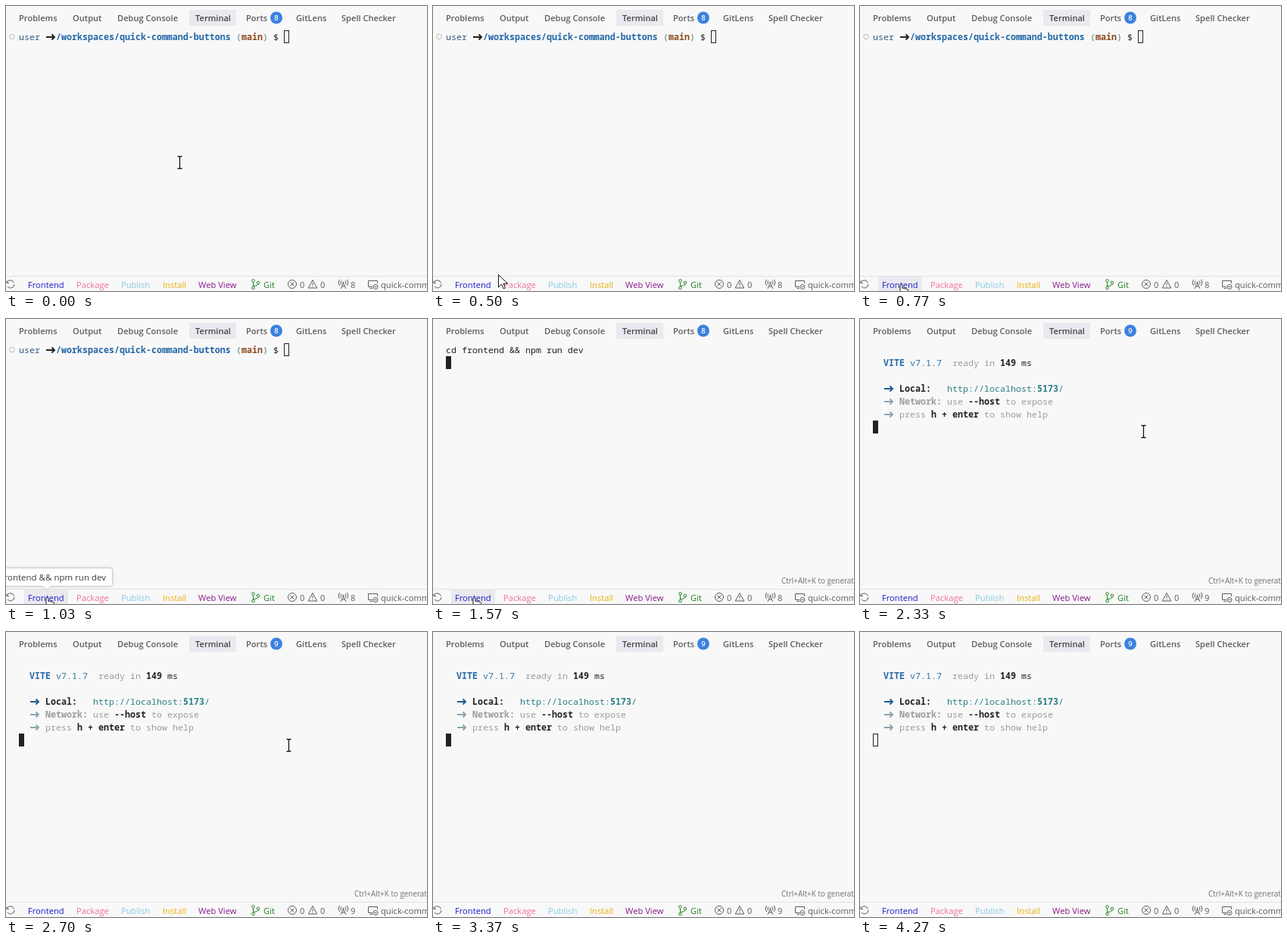
Animation, 556 px wide and 376 px high, one loop 4.3 s. Source, as an HTML page with a canvas:

```html
<!DOCTYPE html>
<html lang="en">
<head>
<meta charset="utf-8">
<title>Quick command buttons</title>
<style>
html, body { margin: 0; width: 100%; height: 100%; overflow: hidden; background: #f8f8f8; }
canvas { display: block; width: 556px; height: 376px; }
</style>
</head>
<body>
<canvas id="stage"></canvas>
<script>
const W = 556, H = 376, LOOP = 4300;
const CELL = 7, LINE = 17, LEFT = 17;
const UI = '"Open Sans", "Noto Sans", sans-serif';
const MONO = '11.667px "Noto Sans Mono", "DejaVu Sans Mono", monospace';
const PAPER = '#f8f8f8', ACTIVE = '#e9e9ef', EDGE = '#e3e3e6';
const INK = '#222', DIM = '#9c9c9c', GRAY = '#5c5c5c', BLUE = '#2468a8', TEAL = '#2a7f86';

const canvas = document.getElementById('stage');
const ctx = canvas.getContext('2d');
const dpr = window.devicePixelRatio || 1;
canvas.width = W * dpr;
canvas.height = H * dpr;

// Moments in the loop
const HOVER = 560, TIP_IN = 900, CLICK = 1130, RUN = 1270;
const READY = 1970, PORT = 2200, HIDE = 3370, BLUR = 4010;

// Pointer path: time, x, y
const path = [
  [30, 229, 206], [500, 86, 354], [640, 54, 367],
  [1960, 54, 367], [2330, 374, 148], [2470, 373, 149],
  [3200, 373, 149], [3350, 260, 85]
];

function pointerAt(t) {
  if (t <= path[0][0]) return path[0].slice(1);
  for (let i = 1; i < path.length; i++) {
    const [t0, x0, y0] = path[i - 1], [t1, x1, y1] = path[i];
    if (t < t1) {
      const u = (t - t0) / (t1 - t0), e = u * u * (3 - 2 * u);
      return [x0 + (x1 - x0) * e, y0 + (y1 - y0) * e];
    }
  }
  return path[path.length - 1].slice(1);
}

function label(text, x, y, color, size = 11.2, weight = 400, align = 'left') {
  ctx.font = `${weight} ${size}px ${UI}`;
  ctx.textAlign = align;
  ctx.fillStyle = color;
  ctx.fillText(text, x, y);
}

function mono(text, col, row, color, bold) {
  ctx.font = (bold ? 'bold ' : '') + MONO;
  ctx.textAlign = 'left';
  ctx.fillStyle = color;
  ctx.fillText(text, LEFT + col * CELL, 45 + row * LINE);
}

function stroke(d, color, width = 1) {
  ctx.strokeStyle = color;
  ctx.lineWidth = width;
  ctx.stroke(new Path2D(d));
}

function ring(x, y, r, color) {
  ctx.beginPath();
  ctx.arc(x, y, r, 0, 7);
  ctx.strokeStyle = color;
  ctx.lineWidth = 1;
  ctx.stroke();
}

function promptArrow(col, row, color) {
  const x = LEFT + col * CELL, y = 41 + row * LINE;
  stroke(`M${x + 1} ${y}H${x + 12}M${x + 8.5} ${y - 3.5}L${x + 12} ${y}L${x + 8.5} ${y + 3.5}`, color, 1.9);
}

function block(col, row, filled) {
  const x = LEFT + col * CELL, y = 32 + row * LINE;
  ctx.fillStyle = ctx.strokeStyle = INK;
  ctx.lineWidth = 1;
  if (filled) ctx.fillRect(x, y, 7, 17);
  else ctx.strokeRect(x + .5, y + .5, 6, 16);
}

function drawTabs(ports) {
  ctx.fillStyle = ACTIVE;
  ctx.fillRect(242, 5, 62, 21);
  const tabs = [['Problems', 17], ['Output', 88], ['Debug Console', 147], ['Terminal', 250],
    ['Ports', 317], ['GitLens', 383], ['Spell Checker', 443]];
  for (const [name, x] of tabs) {
    label(name, x, 20, name === 'Terminal' ? '#454545' : GRAY, 11.1, 600);
  }
  ctx.fillStyle = '#3b82de';
  ctx.beginPath();
  ctx.arc(357, 15.5, 8, 0, 7);
  ctx.fill();
  label(ports, 357, 19, '#fff', 9.5, 600, 'center');
}

function drawStatus(ports, hover) {
  ctx.fillStyle = EDGE;
  ctx.fillRect(0, 356, W, 1);
  if (hover) {
    ctx.fillStyle = ACTIVE;
    ctx.fillRect(24, 357, 58, 19);
  }
  const items = [['Frontend', 29, '#1c1cc8'], ['Package', 93, '#f0709c'], ['Publish', 152, '#86c8e4'],
    ['Install', 207, '#eab010'], ['Web View', 254, '#861a8a'], ['Git', 340, '#228022'],
    ['0', 388, GRAY], ['0', 415, GRAY], [ports, 455, GRAY], ['quick-command-buttons', 495, GRAY]];
  for (const [name, x, color] of items) label(name, x, 372, color);

  // Sync
  stroke('M1 365A5 5 0 0 1 10.5 365.500M11 367A5 5 0 0 1 2 370M1 362.500V365.500H4', GRAY);
  // Branch
  const green = '#228022';
  ring(326.5, 362.5, 1.8, green);
  ring(326.5, 372, 1.8, green);
  ring(333, 365, 1.8, green);
  stroke('M326.500 364.500V370M333 367C333 369 330 369 326.500 369.500', green);
  // Errors and warnings
  ring(378, 367, 5.5, GRAY);
  stroke('M375.500 364.500L380.500 369.500M380.500 364.500L375.500 369.500', GRAY);
  stroke('M405 361.500L410.800 372H399.200ZM405 365V368.500M405 369.700V370.700', GRAY);
  // Antenna
  stroke('M445.500 366L442 373M445.500 366L449 373M443.500 370H447.500M442.800 362.500Q441 365 442.800 367.500M440.800 361Q437.500 365 440.800 369M448.200 362.500Q450 365 448.200 367.500M450.200 361Q453.500 365 450.200 369', GRAY);
  ring(445.5, 365, .8, GRAY);
  // Remote screen
  stroke('M484 370.500H478.500V362.500H490.500V366M480.500 372.500H484', GRAY);
  ring(488, 370.5, 3, GRAY);
  stroke('M486.500 370.500H489.500', GRAY);
}

function drawPrompt() {
  ring(8, 40.5, 3.3, '#bcbcbc');
  mono('user', 0, 0, '#2f5a80');
  promptArrow(5, 0, INK);
  mono('/workspaces/quick-command-buttons', 7, 0, BLUE, true);
  mono('(', 41, 0, '#4f7f86');
  mono('main', 42, 0, '#8b4a1c', true);
  mono(')', 46, 0, '#4f7f86');
  mono('$', 48, 0, INK);
  block(50, 0, false);
}

function drawCommand() {
  mono('cd frontend && npm run dev', 0, 0, INK);
  block(0, 1, true);
}

function drawServer(focused) {
  mono('VITE', 2, 1, BLUE, true);
  mono('v7.1.7', 7, 1, '#34709c');
  mono('ready in', 15, 1, DIM);
  mono('149', 24, 1, INK, true);
  mono('ms', 28, 1, INK);

  promptArrow(2, 3, '#1f5c92');
  mono('Local:', 5, 3, INK, true);
  mono('http://localhost:', 14, 3, TEAL);
  mono('5173', 31, 3, TEAL, true);
  mono('/', 35, 3, TEAL);

  promptArrow(2, 4, '#8ca4ae');
  mono('Network:', 5, 4, DIM, true);
  mono('use', 14, 4, DIM);
  mono('--host', 18, 4, INK, true);
  mono('to expose', 25, 4, DIM);

  promptArrow(2, 5, '#8ca4ae');
  mono('press', 5, 5, DIM);
  mono('h + enter', 11, 5, INK, true);
  mono('to show help', 21, 5, DIM);
  block(0, 6, focused);
}

function drawTip(alpha) {
  ctx.save();
  ctx.globalAlpha = alpha;
  ctx.beginPath();
  ctx.roundRect(-30, 328.5, 170.5, 24, 3);
  ctx.fillStyle = '#fff';
  ctx.shadowColor = 'rgba(0,0,0,.16)';
  ctx.shadowBlur = 5;
  ctx.fill();
  ctx.shadowColor = 'transparent';
  ctx.strokeStyle = '#cdcdd2';
  ctx.lineWidth = 1;
  ctx.stroke();
  ctx.fill(new Path2D('M48 352H60L54 357Z'));
  stroke('M48 352.500L54 357L60 352.500', '#cdcdd2');
  label('cd frontend && npm run dev', 132, 345, '#3b3b3b', 11.5, 400, 'right');
  ctx.restore();
}

const arrow = 'M0 0V16.500L4 12.700L6.700 18.500L9 17.500L6.500 11.800H12Z';
const hand = 'M-1.500 1Q0 -1 1.500 1V5Q3 4 4.200 5.500Q5.500 4.500 6.700 6Q8.500 5.500 9 7V12Q9 15 7 17H0L-4.500 11Q-5.500 8 -2.500 9L-1.500 10Z';
const beam = 'M-3 -8H-1Q0 -8 0 -7Q0 -8 1 -8H3M0 -7V7M-3 8H-1Q0 8 0 7Q0 8 1 8H3';

function drawPointer(x, y, hover) {
  ctx.save();
  ctx.translate(Math.round(x) + .5, Math.round(y) + .5);
  if (!hover && y < 340) {
    stroke(beam, '#fff', 2.5);
    stroke(beam, '#111', 1.3);
  } else {
    const d = hover ? hand : arrow;
    ctx.fillStyle = '#fff';
    ctx.fill(new Path2D(d));
    stroke(d, '#111');
  }
  ctx.restore();
}

function draw(t) {
  ctx.setTransform(dpr, 0, 0, dpr, 0, 0);
  ctx.fillStyle = PAPER;
  ctx.fillRect(0, 0, W, H);
  const ports = t < PORT ? '8' : '9';
  const [x, y] = pointerAt(t);
  const hover = t >= HOVER && y >= 357 && x < 82;

  drawTabs(ports);
  if (t < RUN) drawPrompt();
  else {
    if (t < READY) drawCommand();
    else drawServer(t < BLUR);
    label('Ctrl+Alt+K to generate a command', 460, 349, '#70707a', 9.9);
  }
  drawStatus(ports, hover);
  if (t >= TIP_IN && t < CLICK) drawTip(Math.min(1, (t - TIP_IN) / 90));
  if (t < HIDE) drawPointer(x, y, hover);
}

const start = performance.now();
function tick() {
  draw((performance.now() - start) % LOOP);
  requestAnimationFrame(tick);
}
tick();
</script>
</body>
</html>
```
